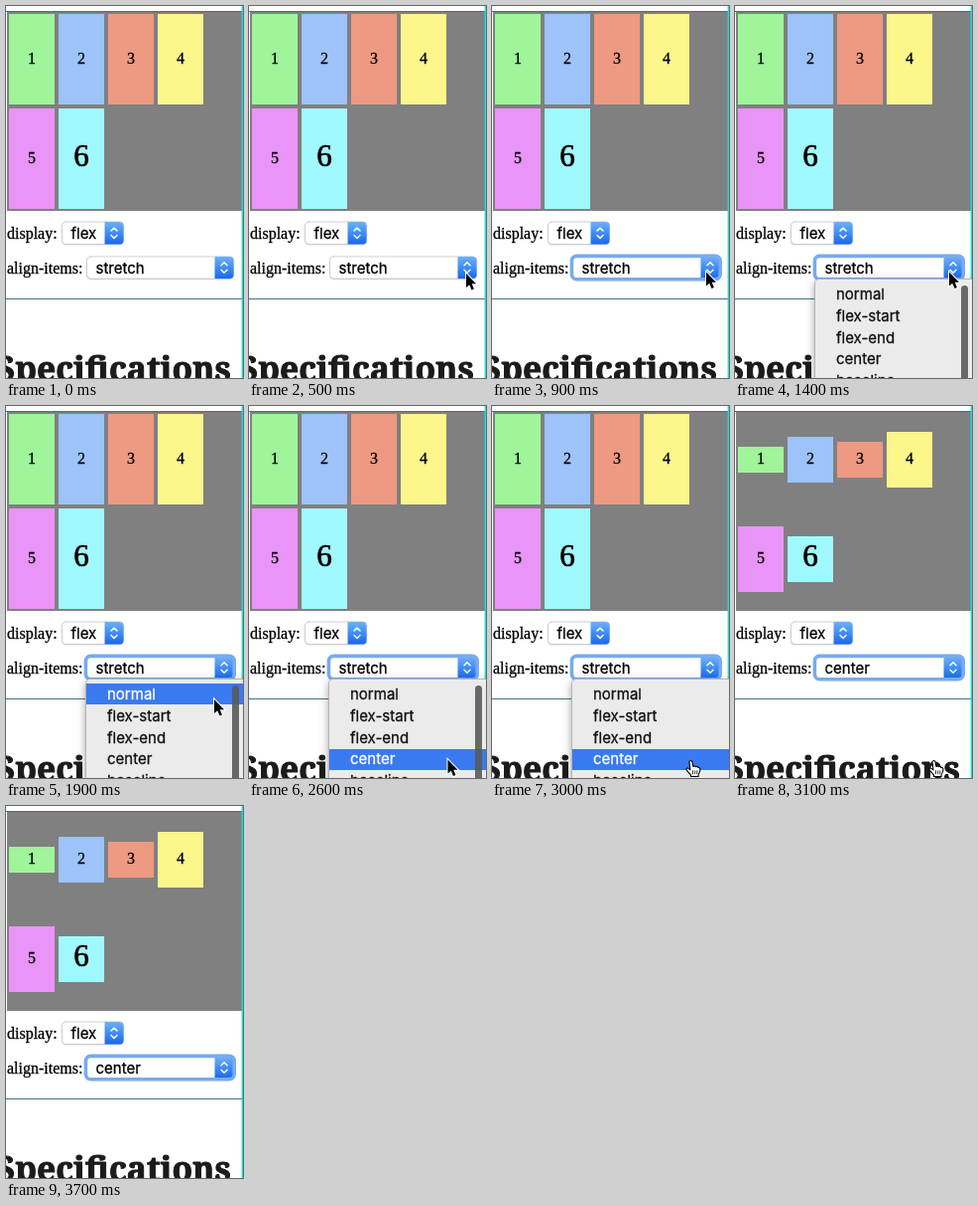
These frames come from a looping animation (239 by 374 pixels, 3.9 s). An HTML page with a canvas:

```html
<!DOCTYPE html>
<html lang="en">
<head>
<meta charset="utf-8">
<title>align-items demo</title>
<style>
html, body { margin: 0; width: 100%; height: 100%; overflow: hidden; background: #fff; }
canvas { display: block; width: 239px; height: 374px; }
</style>
</head>
<body>
<canvas id="stage"></canvas>
<script>
const W = 239, H = 374, LOOP = 3900;
const canvas = document.getElementById('stage');
const ctx = canvas.getContext('2d');
const dpr = window.devicePixelRatio || 1;
canvas.width = Math.round(W * dpr);
canvas.height = Math.round(H * dpr);

const SERIF = '"Liberation Serif", serif';
const UI = '15px Inter, sans-serif';
const LINE = '#3d7288';

// colour and natural height of each flex item
const items = [
  ['#a0f49a', 26], ['#9dc3fa', 46], ['#ee9981', 36],
  ['#fdf68b', 56], ['#ea93f8', 66], ['#a0f9fe', 46]
];
const options = ['normal', 'flex-start', 'flex-end', 'center', 'baseline'];

// pointer tip: time, x, y
const path = [
  [200, 235, 280], [300, 229, 276], [400, 223, 272], [500, 219, 269],
  [600, 216, 267.5], [1600, 215, 270], [1800, 212, 283], [1900, 210, 295],
  [2000, 208, 309], [2100, 205, 326], [2200, 202.5, 338.5], [2300, 201, 346],
  [2400, 200.5, 354], [2600, 200.5, 355.5], [3000, 200.5, 356.5], [3600, 206, 354]
];
const OPEN = 1400, HAND = 3000, CLOSE = 3100, GONE = 3700;

function rect(x, y, w, h, fill) {
  ctx.fillStyle = fill;
  ctx.fillRect(x, y, w, h);
}

function round(x, y, w, h, r) {
  ctx.beginPath();
  ctx.roundRect(x, y, w, h, r);
}

// a hairline stroke gives the slightly heavier smoothed type
function text(s, x, y, font, fill = '#000', align = 'left', weight = 0.3) {
  ctx.font = font;
  ctx.fillStyle = ctx.strokeStyle = fill;
  ctx.textAlign = align;
  ctx.lineWidth = weight;
  ctx.lineJoin = 'round';
  ctx.fillText(s, x, y);
  ctx.strokeText(s, x, y);
}

function withShadow(color, blur, dy, draw) {
  ctx.save();
  ctx.shadowColor = color;
  ctx.shadowBlur = blur * dpr;
  ctx.shadowOffsetY = dy * dpr;
  draw();
  ctx.restore();
}

function drawItems(centered) {
  rect(1, 5, 237, 201, '#808080');
  rect(0, 5, W, 1, LINE);
  items.forEach(([color, natural], i) => {
    const row = i < 4 ? 0 : 1;
    const x = 3 + 50 * (i - 4 * row);
    const full = row ? 101 : 91;
    const h = centered ? natural : full;
    const y = centered ? 54 + 100 * row - h / 2 : (row ? 103 : 8);
    rect(x, y, 46, h, color);
    const big = i === 5;
    text(i + 1, x + 23, 58 + 100 * row + (big ? 3 : 0), (big ? 31 : 16) + 'px ' + SERIF, '#000', 'center', big ? 0.7 : 0.3);
  });
}

function chevron(x, y, dir) {
  ctx.beginPath();
  ctx.moveTo(x - 3, y);
  ctx.lineTo(x, y + 3 * dir);
  ctx.lineTo(x + 3, y);
  ctx.stroke();
}

function drawSelect(x, y, w, h, label) {
  withShadow('rgba(0,0,0,.35)', 1.5, 0.6, () => {
    round(x, y, w, h, 4);
    ctx.fillStyle = '#fff';
    ctx.fill();
  });
  ctx.strokeStyle = '#c6c6c6';
  ctx.lineWidth = 0.7;
  ctx.stroke();
  const blue = ctx.createLinearGradient(0, y, 0, y + h);
  blue.addColorStop(0, '#6db1f9');
  blue.addColorStop(1, '#1769ee');
  round(x + w - 19, y, 19, h, [0, 4, 4, 0]);
  ctx.fillStyle = blue;
  ctx.fill();
  ctx.strokeStyle = '#fff';
  ctx.lineWidth = 1.5;
  ctx.lineCap = ctx.lineJoin = 'round';
  const cx = x + w - 9.5, cy = y + h / 2;
  chevron(cx, cy - 2.3, -1);
  chevron(cx, cy + 2.3, 1);
  text(label, x + 9, y + 17, UI);
}

function drawRing(t) {
  if (t < 800) return;
  const grow = t < 900 ? 2 : 0;
  ctx.strokeStyle = grow ? 'rgba(110,165,243,.5)' : '#79aaf2';
  ctx.lineWidth = 3.6;
  round(80.4 - grow, 251.4 - grow, 149.8 + 2 * grow, 23.4 + 2 * grow, 5 + grow);
  ctx.stroke();
}

function drawMenu(active, barAlpha) {
  withShadow('rgba(0,0,0,.4)', 9, 3, () => {
    round(80.5, 274.5, 164, 120, [4, 0, 0, 0]);
    ctx.fillStyle = '#ebebeb';
    ctx.fill();
  });
  ctx.strokeStyle = '#b4b4b4';
  ctx.lineWidth = 1;
  ctx.stroke();
  if (active >= 0) rect(81, 279 + 22 * active, W - 81, 21, '#3a7af0');
  options.forEach((name, i) => text(name, 102, 294.7 + 21.9 * i, UI, i === active ? '#fff' : '#111'));
  round(228, 281, 7, 110, 3.5);
  ctx.fillStyle = `rgba(90,90,90,${0.9 * barAlpha})`;
  ctx.fill();
}

function drawArrow(x, y) {
  const p = new Path2D('M0 0V14L3.2 11.2L5.5 16.4L7.9 15.4L5.7 10.3H10Z');
  ctx.save();
  ctx.translate(x, y);
  ctx.lineJoin = 'miter';
  ctx.strokeStyle = '#fff';
  ctx.lineWidth = 2;
  ctx.stroke(p);
  ctx.fillStyle = '#000';
  ctx.fill(p);
  ctx.restore();
}

function drawHand(x, y) {
  const p = new Path2D('M-1.6 1.2Q0 -1 1.4 1L2.4 6Q4 4.8 5 6.2Q6.5 5.4 7.3 6.9Q9.4 6.6 9.4 9Q9.4 12 7.6 14V16H0V14.4Q-2 12.5-4.4 9.4Q-5 7.2-2.8 7.6L-.6 9.4Z');
  ctx.save();
  ctx.translate(x, y);
  ctx.fillStyle = '#fff';
  ctx.fill(p);
  ctx.strokeStyle = '#000';
  ctx.lineWidth = 1.1;
  ctx.stroke(p);
  ctx.beginPath();
  for (const dx of [2, 4.2, 6.3]) {
    ctx.moveTo(dx, 10.3);
    ctx.lineTo(dx, 13.3);
  }
  ctx.lineWidth = 0.8;
  ctx.stroke();
  ctx.restore();
}

function draw(t) {
  ctx.setTransform(dpr, 0, 0, dpr, 0, 0);
  rect(0, 0, W, H, '#fff');
  const chosen = t >= CLOSE;
  const tip = path.findLast(k => k[0] <= t);

  drawItems(chosen);
  rect(0, 294, W, 1, LINE);
  text('Specifications', 227, 377, 'bold 33.7px "Noto Serif", serif', '#1b1b1b', 'right', 1);
  rect(237.6, 0, 1.4, H, '#10e2e8');
  text('display:', 1, 234, '16px ' + SERIF);
  text('align-items:', 1, 269, '16px ' + SERIF);
  drawSelect(56.5, 217, 62, 22.5, 'flex');
  drawSelect(81.5, 252, 148, 22, chosen ? 'center' : 'stretch');
  drawRing(t);

  if (t >= OPEN && !chosen) {
    // the scroll bar fades in 100 ms steps
    const fade = Math.floor((t - 2700) / 100) / 3;
    drawMenu(Math.floor((tip[2] - 279) / 22), 1 - Math.min(1, Math.max(0, fade)));
  }
  if (tip && t < GONE) (t < HAND ? drawArrow : drawHand)(tip[1], tip[2]);
}

const start = performance.now();
function frame() {
  draw((performance.now() - start) % LOOP);
  requestAnimationFrame(frame);
}
frame();
</script>
</body>
</html>
```
